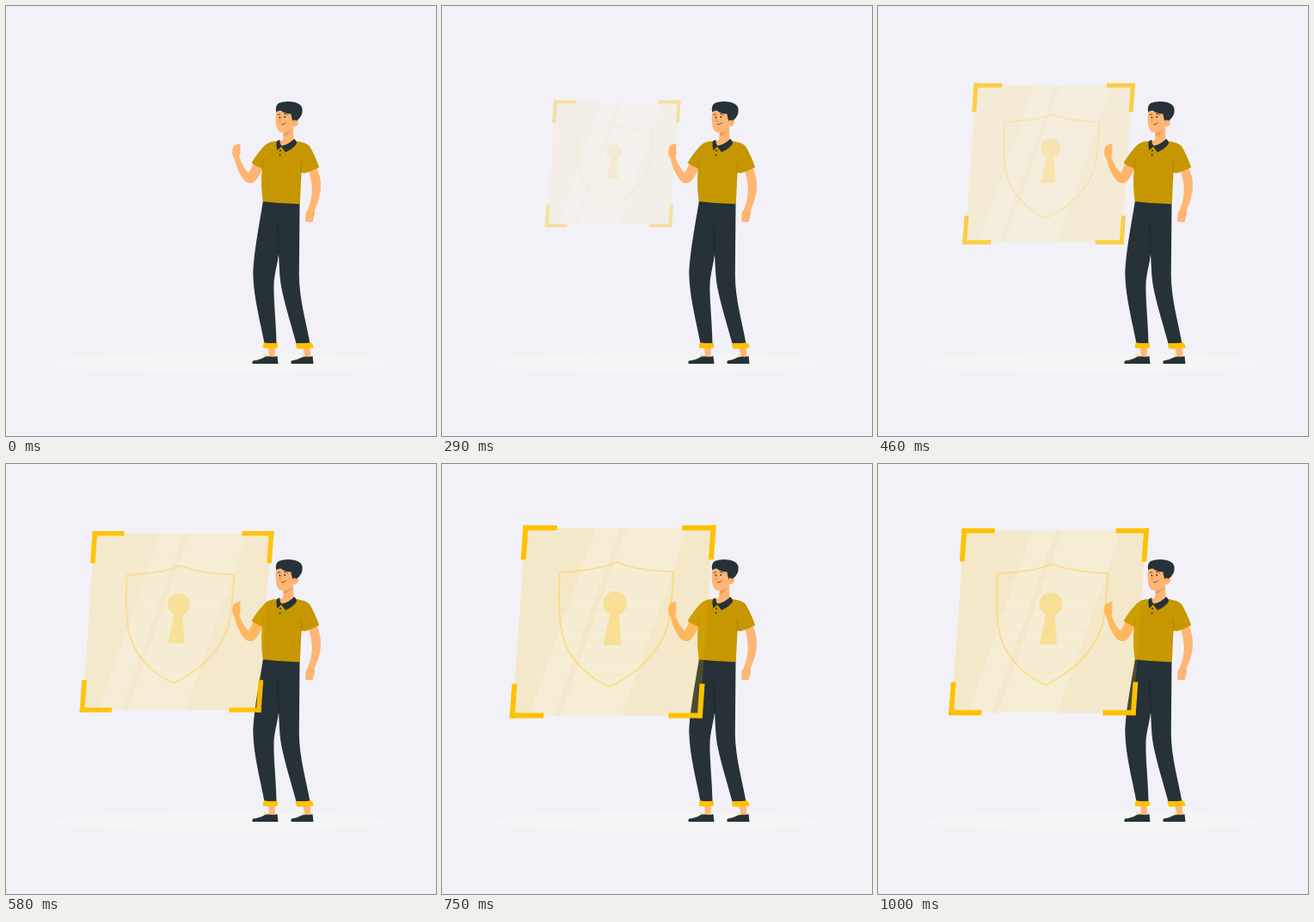
An HTML page with a canvas that plays this animation: 500 px wide and 500 px high, repeating every 1040 ms.

```html
<!DOCTYPE html>
<html lang="en">
<head>
<meta charset="utf-8">
<title>Security panel</title>
<style>
html, body { margin: 0; width: 100%; height: 100%; overflow: hidden; background: #f2f1f7; }
canvas { display: block; width: 100vw; height: 100vh; }
</style>
</head>
<body>
<canvas id="stage" width="500" height="500"></canvas>
<script>
const LOOP = 1040, LAST = 25;
const DARK = '#263238', SKIN = '#ffb573', SHIRT = '#c69700', GOLD = '#ffc100';
const MID = { x: 198.6, y: 183.4 }, HALF = 112.2, SLANT = -0.0714;

const stage = document.getElementById('stage').getContext('2d');
const layer = document.createElement('canvas');
layer.width = layer.height = 500;
const glass = layer.getContext('2d');

function fill(c, color, d) {
  c.fillStyle = color;
  c.fill(new Path2D(d));
}

function line(c, color, width, d) {
  c.strokeStyle = color;
  c.lineWidth = width;
  c.lineCap = c.lineJoin = 'round';
  c.stroke(new Path2D(d));
}

function dot(c, color, x, y, rx, ry = rx) {
  c.fillStyle = color;
  c.beginPath();
  c.ellipse(x, y, rx, ry, 0, 0, Math.PI * 2);
  c.fill();
}

function drawLegs(c) {
  // ankles
  fill(c, SKIN, 'M305 396H313L312.5 409H306Z M345 396H353.5L354.5 409H348Z');
  // shoes
  fill(c, DARK, 'M306 407.5Q311 408.5 315.5 407L316.5 416H287Q285.5 414.5 287 412.5Q295 411.5 300 408.5Q303 406 306 407.5Z');
  fill(c, DARK, 'M348.5 407.5Q352.500 408.5 356.500 407L357.500 416H332Q330.500 414.500 332 412.500Q339 411.500 344 408.500Z');
  line(c, '#f7cf62', 0.8, 'M304 407Q299 403 300 406Q302 408 304.500 407 M348 407.500Q343 404 344.500 406.500Q346 408 348 407.500');
  // trousers
  fill(c, DARK, 'M299 226C296 246 288 286 287.300 312C288 340 296 368 300.500 392.500H314.500C314 366 311 343 311.500 323C312 312 316 299 317 288C318 305 318 317 321 331C325 350 332 372 337.500 392.500H353.500C349 367 341 341 340.800 313L341.500 229Z');
  line(c, '#1b2429', 0.8, 'M315.500 252Q317 268 316.800 290');
  // cuffs
  fill(c, GOLD, 'M299.500 391.300Q308 393 316 391.800L315.800 397.500Q307 399 298.700 397.500Z');
  fill(c, GOLD, 'M336.500 392Q346 393 355 391.200Q357 394 358 397.300Q348 399 338 398.300Z');
}

function drawBody(c) {
  // raised arm
  fill(c, SKIN, 'M288 181C286 187 284.500 191 282 194C277 189 273.500 182 271.500 176Q273.300 171 272.300 167L272.500 161Q271.500 159.300 269.500 160.500L265 162.500Q263 166 263 170Q262.800 174 266 178.500C268 188 273 199 279 204.500Q284 207.500 289 204.500Q295 198 299 187Z');
  // lowered arm
  fill(c, SKIN, 'M352 191C355 203 357 211 355 223C354 229 352 233 351 237Q348 240 348.500 244L348 250.500Q352 251.500 356.500 251L358.500 244Q359.500 240 359 237C363 228 366 219 366 209Q366 198 361 187Z');
  line(c, '#e89a5b', 0.6, 'M354 239Q356 242 358.500 242');
  // shirt
  fill(c, SHIRT, 'M314 157.200Q306 157 301 162Q293 170 285.500 182.500Q291 187 297.800 188.800C296.500 202 297 216 298.800 227.200Q320 230 341.800 230.200L343.500 193.500L347 194.500Q356 192 364.200 187.500Q359 173 353 163Q350 159 338 157Z');
  line(c, '#a57e00', 0.8, 'M298 189Q298 181 300 177 M343.500 194Q344.500 188 343 182');
  // neck
  fill(c, SKIN, 'M323 145L322 155Q318 158 319 164Q328 162 334.500 155L334 140Z');
  fill(c, '#e89a5b', 'M323 147Q329 147 332 143Q329 150 322.800 151Z');
  // collar
  fill(c, DARK, 'M318.500 155.500Q316 155.800 314.500 158Q314 163 315.500 168L320 163.500Q322 166 325 170Q334 166 338 160Q338 156.500 335 154.500Q329 161 320.500 162.500Q317.500 159 318.500 155.500Z');
  dot(c, DARK, 319, 168.300, 1);
  dot(c, DARK, 318.600, 173.300, 1);
}

function drawHead(c) {
  fill(c, SKIN, 'M315 120C313.500 126 313 134 314.500 140Q316 147 322 147.500Q329 147.500 333 140Q339.500 141 340 135Q340 130 336 131L333 120Z');
  fill(c, DARK, 'M314.200 123.500Q312.500 116 317.500 112.800Q324 110.300 332 111.300Q341 112 344 117.500Q345.500 122 343.500 127Q341.500 131.500 337.500 133.500Q335 131.500 333.500 134Q332 131 331.500 125.500Q324 125.500 319.500 121.500Q316 121.500 314.200 123.500Z');
  dot(c, DARK, 318.300, 129.500, 0.8, 1.1);
  dot(c, DARK, 324.300, 129.200, 0.8, 1.1);
  line(c, DARK, 0.8, 'M316 126.500Q317.300 125.300 318.700 125.800 M323.500 125.500Q325.500 125 327 126.500');
  line(c, '#d58745', 0.7, 'M320.300 129Q318 132.500 318 133.800Q319 134.500 320.300 134.200');
  line(c, DARK, 0.7, 'M320.500 137.500Q323.500 138.500 325.500 135.800');
  line(c, '#d58745', 0.6, 'M335.500 136Q336 133.500 338 133.500');
}

function drawScene(c) {
  c.fillStyle = '#f2f1f7';
  c.fillRect(0, 0, 500, 500);
  dot(c, '#f5f5f5', 249, 415.500, 192, 12);
  drawLegs(c);
  drawBody(c);
  drawHead(c);
}

function slanted(c, draw) {
  c.save();
  c.translate(MID.x, MID.y);
  c.transform(1, 0, SLANT, 1, 0, 0);
  draw();
  c.restore();
}

function drawShield(c) {
  const d = 'M203.500 114Q181 123.500 137 125.800C135.500 148 135.500 173 138.500 192C143 220 164 246 194.500 259.200C228 244 253 218 262 190C267 171 268 149 269.500 125.200Q226 124 203.500 114Z';
  c.save();
  c.clip(new Path2D(d));
  for (let y = 130; y < 255; y += 12.700) {
    line(c, 'rgba(255,193,0,.09)', 1.300, `M130 ${y}H275`);
  }
  c.restore();
  line(c, 'rgba(255,193,0,.32)', 2, d);
  fill(c, '#f9df95', 'M196 170H205.500L208.300 210.500H187.800Z');
  dot(c, '#f9df95', 201, 162, 13.800);
}

function drawPanel(c) {
  slanted(c, () => {
    c.fillStyle = 'rgba(255,193,0,.18)';
    c.fillRect(-109.200, -109.200, 218.400, 218.400);
  });
  const shine = 'rgba(255,255,255,.2)';
  fill(c, shine, 'M179 74.200H207L130 292.600H101.500Z');
  fill(c, shine, 'M214.500 74.200H286L209 292.600H138Z');
  drawShield(c);
  slanted(c, () => {
    c.fillStyle = GOLD;
    for (const sx of [-1, 1]) for (const sy of [-1, 1]) {
      c.save();
      c.scale(sx, sy);
      c.fillRect(HALF - 39.500, HALF - 6, 39.500, 6);
      c.fillRect(HALF - 6, HALF - 40, 6, 40);
      c.restore();
    }
  });
}

const curve = (u, a, b) => 3 * (1 - u) * (1 - u) * u * a + 3 * (1 - u) * u * u * b + u * u * u;

function ease(x) {
  let lo = 0, hi = 1;
  for (let i = 0; i < 30; i++) {
    const u = (lo + hi) / 2;
    if (curve(u, 0.36, 0.5) < x) lo = u; else hi = u;
  }
  return curve(lo, -0.01, 1.38);
}

// step number -> position along the easing
const PACE = [[3, 0.158], [5, 0.238], [9, 0.397], [11, 0.49], [14, 0.623], [18, 0.795], [24, 1]];

function pace(n) {
  const i = Math.max(1, PACE.findIndex(p => p[0] >= n));
  const [n0, x0] = PACE[i - 1], [n1, x1] = PACE[i];
  return x0 + (x1 - x0) * (n - n0) / (n1 - n0);
}

// 24 steps a second, each on a 10 ms grid
function stepAt(t) {
  let n = LAST - 1;
  while (n && Math.round(n * 25 / 6) * 10 > t) n--;
  return n;
}

function render(t) {
  drawScene(stage);
  const n = stepAt(t);
  if (n < 3) return;
  const p = ease(pace(n));
  const size = (108.500 + 109 * p) / (2 * HALF);
  glass.setTransform(1, 0, 0, 1, 0, 0);
  glass.clearRect(0, 0, 500, 500);
  glass.translate(MID.x, MID.y);
  glass.scale(size, size);
  glass.translate(-MID.x, -MID.y);
  drawPanel(glass);
  stage.globalAlpha = Math.min(1, p);
  stage.drawImage(layer, 0, 0);
  stage.globalAlpha = 1;
}

const start = performance.now();
function tick() {
  render((performance.now() - start) % LOOP);
  requestAnimationFrame(tick);
}
tick();
</script>
</body>
</html>
```
